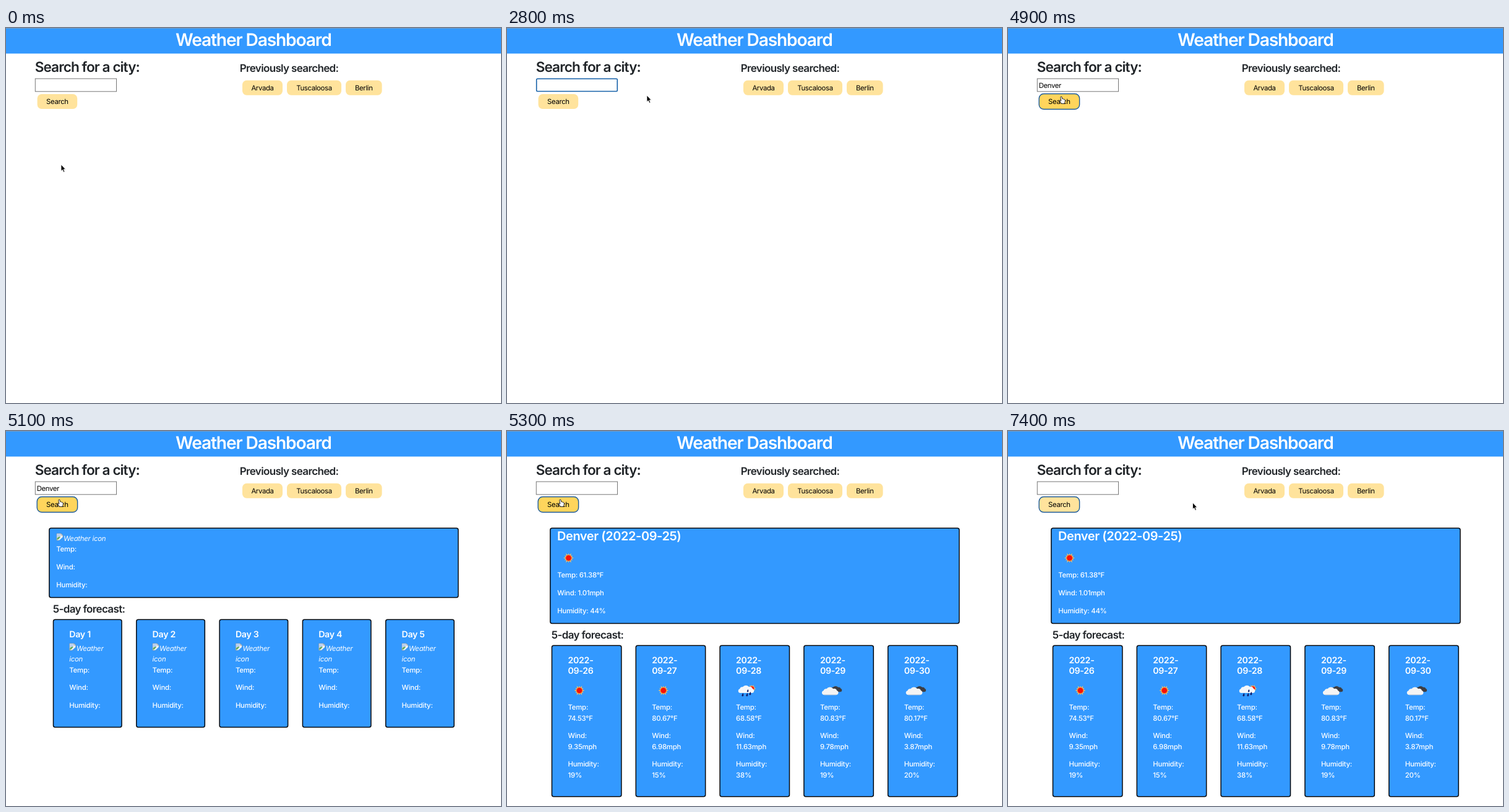
Recreate the animation shown at these times as an HTML page. Size 800x607 px, loop 8000 ms.

```html
<!DOCTYPE html>
<html lang="en">
<head>
<meta charset="utf-8">
<title>Weather Dashboard</title>
<style>
  html, body { margin: 0; width: 100%; height: 100%; overflow: hidden; background: #fff; }
  svg { display: block; width: 100%; height: 100%; }
  text {
    font-family: Inter, "Liberation Sans", sans-serif;
    font-optical-sizing: none;
    text-rendering: geometricPrecision;
    white-space: pre;
  }
  .title { font-size: 28.2px; font-weight: 600; letter-spacing: -.041em; fill: #fff; }
  .h2 { font-size: 22.6px; font-weight: 560; letter-spacing: -.041em; fill: #212529; }
  .h4 { font-size: 17px; font-weight: 560; letter-spacing: -.038em; fill: #212529; }
  .city { font-size: 20px; font-weight: 600; letter-spacing: -.022em; fill: #fff; }
  .day { font-size: 14.2px; font-weight: 600; letter-spacing: -.022em; fill: #fff; }
  .body { font-size: 11.4px; font-weight: 450; letter-spacing: -.022em; fill: #fff; }
  .alt { font-size: 11.4px; font-weight: 450; letter-spacing: -.024em; font-style: italic; fill: #fff; }
  .control { font-size: 11.4px; font-weight: 430; letter-spacing: -.032em; fill: #000; }
  .button { text-anchor: middle; }
</style>
</head>
<body>
<svg id="stage" viewBox="0 0 800 607" preserveAspectRatio="none">
  <defs>
    <g id="sun">
      <path id="rays" fill="#ffc061"/>
      <circle r="5.3" fill="#ff8a2b"/>
      <circle r="4.3" fill="#f80f08"/>
    </g>
    <path id="puff" d="M-11-1H10A3.6 3.6 0 0 0 11-8 5 5 0 0 0 5-11 7 7 0 0 0-6-11 4.5 4.5 0 0 0-11-8 3.6 3.6 0 0 0-11-1Z"/>
    <g id="clouds">
      <use href="#puff" transform="translate(7 3) scale(.74)" fill="#3d3d42"/>
      <use href="#puff" transform="translate(-2 8) scale(.98)" fill="#f4f4f4"/>
      <path d="M-12 7H8" stroke="#c9ccd2" stroke-width="1"/>
    </g>
    <g id="rain">
      <use href="#sun" transform="translate(7 -3) scale(.8)"/>
      <use href="#puff" transform="translate(-2 5) scale(.94 .97)" fill="#f5f7fa"/>
      <path d="M-7 4q-4 5-1 5.500q3 0 1-5.500ZM0 4q-4 5-1 5.500q3 0 1-5.500ZM5 2q-4 5-1 5.500q3 0 1-5.500ZM1-2q-3 4-1 4.500q3 0 1-4.500Z" fill="#101b68"/>
    </g>
    <g id="broken">
      <path d="M.5.500H7.500L10.500 3.500V11.500H.5Z" fill="#eef3f8" stroke="#8d9299" stroke-width=".7"/>
      <path d="M1 8Q4 4 6.500 6L4 9 1 11Z" fill="#65a957"/>
      <path d="M1 1H6.500V5L1 7Z" fill="#b7cff0"/>
      <path d="M11 5.500 4 12H11Z" fill="#3399ff"/>
      <path d="M7.500.500V3.500H10.500" fill="none" stroke="#8d9299" stroke-width=".7"/>
    </g>
  </defs>

  <rect width="800" height="607" fill="#fff"/>
  <rect width="800" height="41.400" fill="#39f"/>
  <rect width="800" height="1" fill="#6f9cc9"/>
  <text class="title" x="274" y="28.500">Weather Dashboard</text>
  <text class="h2" x="46.700" y="70.800">Search for a city:</text>
  <text class="h4" x="377.700" y="70.800">Previously searched:</text>

  <rect id="input" fill="#fff"/>
  <text id="typed" class="control" x="49.700" y="96.800"></text>
  <rect id="caret" y="85.500" width="1" height="13" fill="#000"/>
  <g id="buttons"></g>
  <rect id="ring" x="50.200" y="106.500" width="65.400" height="25" rx="7.500" fill="none" stroke="#1c5a96" stroke-width="1.400"/>
  <g id="empty"></g>
  <g id="report"></g>

  <g id="cursor">
    <path id="arrow" d="M0 0V10.600L2.400 8.400 4.100 12.400 5.900 11.600 4.200 7.800H7.300Z" fill="#000" stroke="#fff" stroke-width=".8"/>
    <path id="beam" d="M-2.600-5.500Q0-5.500 0-4 0-5.500 2.600-5.500M0-4.500V5M-2.600 6Q0 6 0 4.500 0 6 2.600 6M-1.300 1.500H1.300" fill="none" stroke="#222" stroke-width="1"/>
    <path id="hand" d="M2.400 2.200Q2.400.700 3.500.700 4.400.700 4.700 1.700L5.400 4.600Q6.400 4 7 4.800 8 4.400 8.400 5.300 9.600 5 9.800 6.400L9.600 9.500 8.600 12.200H4Q2.600 10 .8 7.600.6 6.400 2 6.700L3.300 7.800Z" fill="#fff" stroke="#000" stroke-width=".85" stroke-linejoin="round"/>
  </g>
</svg>
<script>
const LOOP = 8000, STEP = 100;
const $ = id => document.getElementById(id);

function add(parent, tag, attrs, content = "") {
  const node = document.createElementNS("http://www.w3.org/2000/svg", tag);
  for (const key in attrs) node.setAttribute(key, attrs[key]);
  node.textContent = content;
  parent.append(node);
  return node;
}
const set = (node, attrs) => { for (const key in attrs) node.setAttribute(key, attrs[key]); };
const show = (node, on) => node.setAttribute("visibility", on ? "visible" : "hidden");
const label = (parent, style, x, y, content) => add(parent, "text", { class: style, x, y }, content);
const icon = (parent, name, x, y) => add(parent, "use", { href: "#" + name, x, y });
const panel = (parent, x, y, width, height) => add(parent, "rect",
  { x, y, width, height, rx: 3, fill: "#39f", stroke: "#05080d", "stroke-width": 1.5 });

function button(x, y, width, name) {
  const box = add($("buttons"), "rect", { x, y, width, height: 24, rx: 7, fill: "#ffe39c" });
  label($("buttons"), "control button", x + width / 2, y + 16.2, name);
  return box;
}

function buildRays() {
  let d = "";
  for (let i = 0; i < 12; i++) {
    const a = i * Math.PI / 6, r = i % 2 ? 7.4 : 8.6;
    const at = (radius, turn) => `${radius * Math.cos(a + turn)} ${radius * Math.sin(a + turn)}`;
    d += `M${at(5, -.25)}L${at(r, 0)}L${at(5, .25)}Z`;
  }
  $("rays").setAttribute("d", d);
}

function buildEmpty(g) {
  panel(g, 69.9, 157.2, 661, 112.4);
  icon(g, "broken", 81.5, 165.5);
  label(g, "alt", 93, 177.8, "Weather icon");
  ["Temp:", "Wind:", "Humidity:"].forEach((name, i) => label(g, "body", 81.3, 195.2 + i * 28.8, name));
  label(g, "h4", 75.7, 294, "5-day forecast:");
  for (let i = 0; i < 5; i++) {
    const x = 76.5 + i * 134.3, left = x + 25.8;
    panel(g, x, 305.2, 110.5, 174.2);
    label(g, "day", left, 333.8, "Day " + (i + 1));
    icon(g, "broken", left, 343.5);
    label(g, "alt", left + 11.5, 356, "Weather");
    label(g, "alt", left, 373.4, "icon");
    ["Temp:", "Wind:", "Humidity:"].forEach((name, k) => label(g, "body", left, 390.6 + k * 28.8, name));
  }
}

function buildReport(g) {
  panel(g, 69.9, 157.2, 661, 154.2);
  label(g, "city", 81, 177.3, "Denver (2022-09-25)");
  icon(g, "sun", 99.5, 205.5);
  ["Temp: 61.38°F", "Wind: 1.01mph", "Humidity: 44%"]
    .forEach((line, i) => label(g, "body", 81.3, 237.2 + i * 28.8, line));
  label(g, "h4", 71.7, 335.8, "5-day forecast:");
  const days = [
    ["26", "sun", "74.53", "9.35", 19],
    ["27", "sun", "80.67", "6.98", 15],
    ["28", "rain", "68.58", "11.63", 38],
    ["29", "clouds", "80.83", "9.78", 19],
    ["30", "clouds", "80.17", "3.87", 20]
  ];
  days.forEach(([date, sky, temp, wind, humidity], i) => {
    const x = 72.5 + i * 135.8, left = x + 26;
    panel(g, x, 347.2, 112.4, 244.6);
    label(g, "day", left, 375.6, "2022-");
    label(g, "day", left, 392.8, "09-" + date);
    icon(g, sky, x + 44.5, 420);
    [["Temp:", temp + "°F"], ["Wind:", wind + "mph"], ["Humidity:", humidity + "%"]].forEach(([name, value], k) => {
      label(g, "body", left, 451.4 + k * 46, name);
      label(g, "body", left, 468.6 + k * 46, value);
    });
  });
}

// Cursor stops: time, x, y
const path = [
  [200, 89, 221], [1200, 132.5, 94], [1300, 132.5, 94], [1900, 226, 109],
  [4200, 226, 109], [4300, 182, 113], [4800, 82.5, 110.3], [6700, 82.5, 110.3], [7400, 298.5, 116]
];
function cursorAt(t) {
  const next = path.findIndex(p => p[0] > t);
  if (next === 0) return path[0].slice(1);
  if (next < 0) return path[path.length - 1].slice(1);
  const [t0, x0, y0] = path[next - 1], [t1, x1, y1] = path[next];
  const u = (t - t0) / (t1 - t0), ease = u * u * (3 - 2 * u);
  return [x0 + (x1 - x0) * ease, y0 + (y1 - y0) * ease];
}

const within = (t, from, to) => t >= from && t < to;
const keyTimes = [2900, 3100, 3200, 3400, 3600, 3800];

buildRays();
const search = button(50.6, 107, 64.6, "Search");
button(382, 84.8, 65, "Arvada");
button(454, 84.8, 88, "Tuscaloosa");
button(549, 84.8, 58.6, "Berlin");
buildEmpty($("empty"));
buildReport($("report"));

function render(t) {
  const focused = within(t, 1300, 4900);
  set($("input"), focused
    ? { x: 47.7, y: 82.3, width: 130.6, height: 20.2, rx: 1.5, stroke: "#1560a8", "stroke-width": 1.6 }
    : { x: 47.3, y: 82, width: 131.2, height: 20.8, rx: 0, stroke: "#767676", "stroke-width": 1 });

  const count = t < 5200 ? keyTimes.filter(k => t >= k).length : 0;
  $("typed").textContent = "Denver".slice(0, count);
  const caretX = count ? 49.7 + $("typed").getComputedTextLength() : 49;
  $("caret").setAttribute("x", caretX);
  show($("caret"), within(t, 1300, 1800) || within(t, 2300, 2800) || within(t, 2900, 4300));

  show($("empty"), within(t, 5100, 5200));
  show($("report"), t >= 5200);

  const [x, y] = cursorAt(t);
  const overSearch = x >= 50 && x < 113 && y > 105 && y < 131;
  const overInput = x > 47 && x < 179 && y > 81 && y < 104;
  const hidden = within(t, 2900, 4300);
  search.setAttribute("fill", overSearch ? "#ffd55c" : "#ffe39c");
  show($("ring"), t >= 4900);
  $("cursor").setAttribute("transform", `translate(${x} ${y})`);
  show($("hand"), !hidden && overSearch);
  show($("beam"), !hidden && overInput);
  show($("arrow"), !hidden && !overSearch && !overInput);
}

const start = performance.now();
function tick() {
  const t = (performance.now() - start) % LOOP;
  render(Math.floor(t / STEP) * STEP);
  requestAnimationFrame(tick);
}
tick();
</script>
</body>
</html>
```
